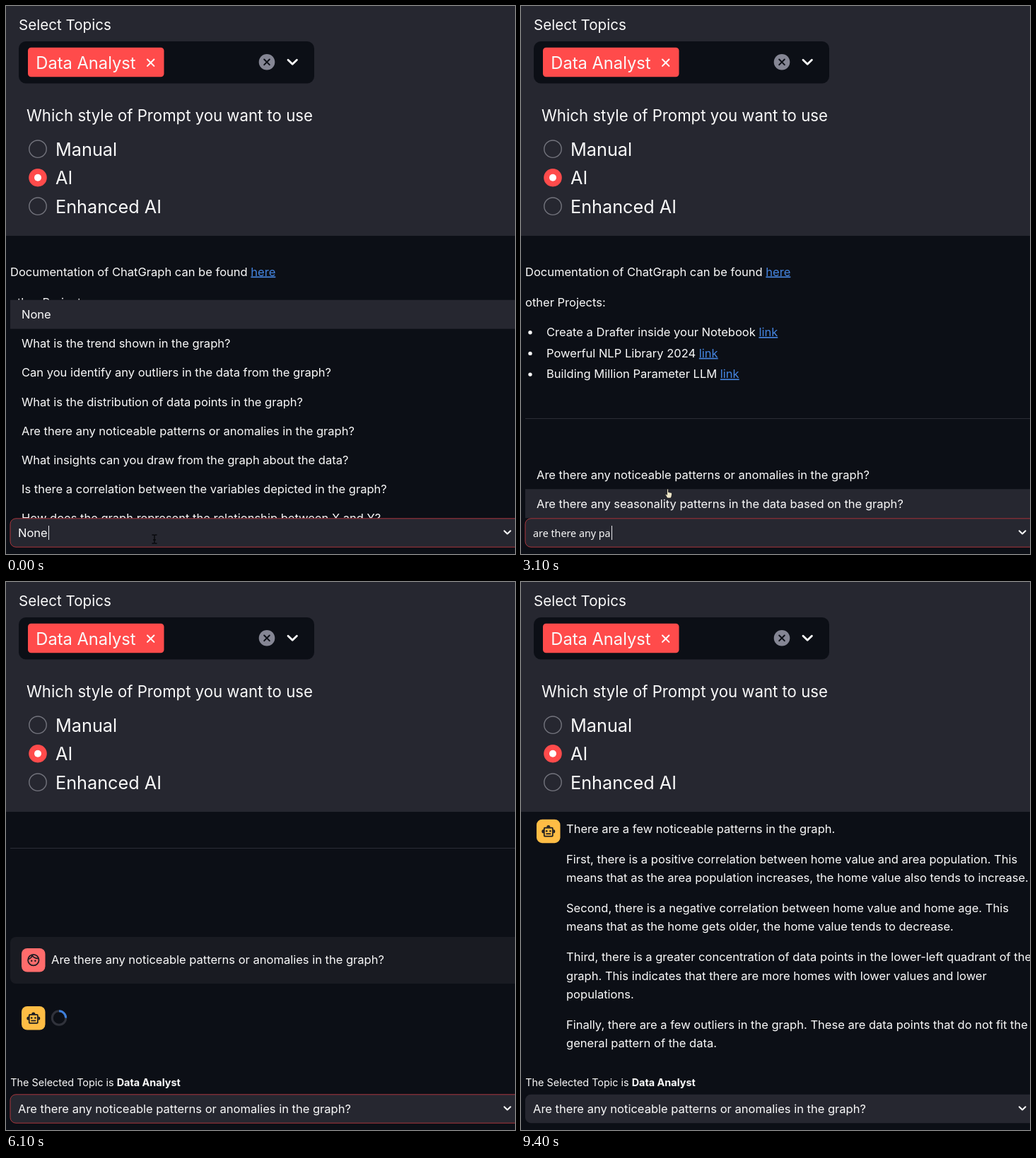
An HTML page that plays this animation: 720x775 px, repeating every 9.5 s.

```html
<!DOCTYPE html>
<html lang="en">
<head>
<meta charset="utf-8">
<title>Graph chat</title>
<style>
  html, body { margin: 0; height: 100%; overflow: hidden; background: #0c0f16; }
  svg { display: block; }
  text { font: 16.52px Inter, sans-serif; font-optical-sizing: none; fill: #fafafa; white-space: pre; }
  .link { fill: #4585e0; text-decoration: underline; }
  .typed { font: 14.3px "Noto Sans", sans-serif; }
  .small { font-size: 14.42px; }
  .bold { font-weight: 700; }
  .radio { font-size: 25.25px; }
  .line { fill: none; stroke-width: 2; stroke-linecap: round; stroke-linejoin: round; }
  .ink { fill: none; stroke: #1b1c22; stroke-width: 2; }
  .solid { fill: #1b1c22; stroke: none; }
</style>
</head>
<body>
<svg width="720" height="775" viewBox="0 0 720 775">
  <rect width="720" height="775" fill="#0c0f16"/>

  <g id="page">
    <text x="6" y="381.5">Documentation of ChatGraph can be found <tspan class="link">here</tspan></text>
    <text x="6" y="424.5">other Projects:</text>
    <g id="projects"></g>
    <path d="M6 583.5H720" stroke="#2b2d36"/>
    <g id="chat">
      <rect x="6" y="709" width="740" height="66" rx="8" fill="#191b22"/>
      <rect x="22" y="725" width="33.5" height="33.5" rx="8" fill="#ff6c6c"/>
      <g class="ink" transform="translate(38.8 741.7) scale(.86)">
        <circle r="9"/>
        <path d="M-8.5-1.5Q-3.5-3-2-7.5Q2-2 8.5-2.8"/>
        <g class="solid"><circle cx="-3" cy="1.2" r="1.4"/><circle cx="3" cy="1.2" r="1.4"/></g>
      </g>
      <text x="64" y="747.3" class="question"></text>
      <rect x="22" y="807" width="33.5" height="33.5" rx="8" fill="#ffbd45"/>
      <g class="ink" transform="translate(38.8 824) scale(.86)">
        <rect x="-7" y="-6" width="14" height="14" rx="1"/>
        <path class="solid" d="M-3-7a3 3 0 0 1 6 0ZM-8-3a3 3 0 0 0 0 6ZM8-3a3 3 0 0 1 0 6Z"/>
        <g class="solid"><circle cx="-3" cy="-.5" r="1.5"/><circle cx="3" cy="-.5" r="1.5"/></g>
        <path d="M-4 4H4"/>
      </g>
      <g id="spinner" fill="none" stroke-width="3">
        <circle cx="75" cy="823.5" r="9.7" stroke="#30323b"/>
        <path id="arc" d="M75 813.8A9.7 9.7 0 0 1 84.7 823.5" stroke="#3d7fdc"/>
      </g>
      <g id="answer"></g>
    </g>
  </g>

  <g id="sidebar">
    <rect width="720" height="325" fill="#262730"/>
    <text x="18" y="33.7" style="font-size:20.6px">Select Topics</text>
    <rect x="18" y="50" width="418" height="59.5" rx="10" fill="#0c0f16"/>
    <rect x="31" y="58.8" width="192.5" height="41.4" rx="4.5" fill="#ff4b4b"/>
    <text x="42.3" y="88.7" style="font-size:23.7px">Data Analyst</text>
    <path class="line" stroke="#fff" d="M200 75.5l9.4 9.4m0-9.4l-9.4 9.4"/>
    <circle cx="369" cy="79.3" r="11.3" fill="#858694"/>
    <path class="line" stroke="#0c0f16" d="M365.2 75.5l7.6 7.6m0-7.6l-7.6 7.6"/>
    <path class="line" stroke="#fff" style="stroke-width:2.8" d="M399 76.3l6.2 6 6.2-6"/>
    <text x="29" y="163.3" style="font-size:22.2px">Which style of Prompt you want to use</text>
    <g id="radios"></g>
  </g>

  <rect y="692" width="720" height="83" fill="#0c0f16"/>
  <text class="small" x="6.3" y="713.2">The Selected Topic is <tspan class="bold">Data Analyst</tspan></text>
  <clipPath id="menuClip"><rect y="415.4" width="720" height="309"/></clipPath>
  <g id="menu" clip-path="url(#menuClip)"></g>
  <rect id="field" x="6" y="724.8" width="740" height="40.4" rx="8" fill="#262730"/>
  <text id="value" x="17" y="750.6"></text>
  <path id="caret" d="M0 735V755" stroke="#e8e8ec"/>
  <path class="line" stroke="#fff" d="M704.8 742.3l4.4 4.2 4.4-4.2"/>

  <path id="beam" fill="none" stroke="#08090c" stroke-width="1.4" d="M-3.5-6H-1L0-5 1-6H3.5M0-5V5M-3.5 6H-1L0 5 1 6H3.5M-2 1H2"/>
  <path id="hand" fill="#eee6c8" stroke="#15161b" stroke-width=".8"
    d="M-2.5-6.5q1.2-.9 2 0V-2.5l4 .8q1.3.4 1.1 2L4 3.5 3 6H-2L-4.8 1.3q-.4-1.5.8-1l1.5 1Z"/>
</svg>

<script>
const LOOP = 9500, ROW = 41.2, MENU_BOTTOM = 724.4, MENU_HEIGHT = 309;
const TYPE_START = 280, KEY_TIME = 100, SELECT = 4600, SEND = 4800, REPLY = 7200;
const QUERY = "are there any pa";
const TYPE_END = TYPE_START + (QUERY.length - 1) * KEY_TIME;
const QUESTION = "Are there any noticeable patterns or anomalies in the graph?";
const OPTIONS = [
  "None",
  "What is the trend shown in the graph?",
  "Can you identify any outliers in the data from the graph?",
  "What is the distribution of data points in the graph?",
  QUESTION,
  "What insights can you draw from the graph about the data?",
  "Is there a correlation between the variables depicted in the graph?",
  "How does the graph represent the relationship between X and Y?",
  "Are there any seasonality patterns in the data based on the graph?"
];
const ANSWER = [
  ["There are a few noticeable patterns in the graph."],
  ["First, there is a positive correlation between home value and area population. This",
   "means that as the area population increases, the home value also tends to increase."],
  ["Second, there is a negative correlation between home value and home age. This",
   "means that as the home gets older, the home value tends to decrease."],
  ["Third, there is a greater concentration of data points in the lower-left quadrant of the",
   "graph. This indicates that there are more homes with lower values and lower",
   "populations."],
  ["Finally, there are a few outliers in the graph. These are data points that do not fit the",
   "general pattern of the data."]
];

const $ = id => document.getElementById(id);
const show = (id, on) => $(id).style.display = on ? "" : "none";
const label = (x, y, text, cls = "") => `<text x="${x}" y="${y}" class="${cls}">${text}</text>`;

$("projects").innerHTML = ["Create a Drafter inside your Notebook", "Powerful NLP Library 2024",
  "Building Million Parameter LLM"].map((name, i) => {
    const y = 467 + i * 29.7;
    return `<circle cx="13" cy="${y - 5.3}" r="2.7" fill="#fafafa"/>` +
      label(36, y, `${name} <tspan class="link">link</tspan>`);
  }).join("");

$("radios").innerHTML = ["Manual", "AI", "Enhanced AI"].map((name, i) => {
  const y = 202.2 + i * 40.5;
  const dot = i === 1
    ? `<circle cx="45" cy="${y}" r="12.8" fill="#ff4b4b"/><circle cx="45" cy="${y}" r="5" fill="#fff"/>`
    : `<circle cx="45" cy="${y}" r="12.2" fill="none" stroke="#74757e" stroke-width="1.4"/>`;
  return dot + label(70, y + 9.6, name, "radio");
}).join("");

let lineY = 826.3;
$("answer").innerHTML = ANSWER.map(lines => {
  const block = lines.map((line, i) => label(64, lineY + i * 26.35, line)).join("");
  lineY += lines.length * 26.35 + 16.5;
  return block;
}).join("");
document.querySelector(".question").textContent = QUESTION;

// Keeps options that contain the typed letters in order, exact phrases first.
function matches(query) {
  const exact = s => s.toLowerCase().includes(query);
  return OPTIONS.filter(s => {
    let at = 0;
    return [...query].every(c => (at = s.toLowerCase().indexOf(c, at) + 1));
  }).sort((a, b) => exact(b) - exact(a));
}

// Smooth value through [time, value] points.
function track(t, points) {
  let [t0, v0] = points[0];
  for (const [t1, v1] of points) {
    if (t < t1) {
      const u = Math.max(0, (t - t0) / (t1 - t0));
      return v0 + (v1 - v0) * u * u * (3 - 2 * u);
    }
    [t0, v0] = [t1, v1];
  }
  return v0;
}

function drawMenu(query, mouseY) {
  const items = matches(query);
  const top = MENU_BOTTOM - Math.min(items.length * ROW, MENU_HEIGHT);
  const active = mouseY < MENU_BOTTOM ? Math.floor((mouseY - top) / ROW) : 0;
  $("menu").innerHTML = `<rect x="6" y="${top}" width="714" height="${MENU_BOTTOM - top}" fill="#0c0f16"/>` +
    items.map((item, i) => {
      const y = top + i * ROW;
      const back = i === active ? `<rect x="6" y="${y}" width="714" height="${ROW}" fill="#262730"/>` : "";
      return back + label(22, y + 26.6, item);
    }).join("");
}

function draw(t) {
  const open = t < SELECT;
  const count = Math.floor((t - TYPE_START) / KEY_TIME) + 1;
  const query = QUERY.slice(0, Math.max(0, count));
  const mouseX = track(t, [[2300, 210], [2900, 209], [3300, 209], [3900, 214]]);
  const mouseY = track(t, [[2300, 754], [2900, 690], [3300, 690], [3900, 671]]);
  const overMenu = mouseY < MENU_BOTTOM;

  show("menu", open);
  if (open) drawMenu(query, mouseY);

  $("value").textContent = open ? query || "None" : QUESTION;
  $("value").setAttribute("class", open && query ? "typed" : "");
  const caretX = Math.round(18 + $("value").getComputedTextLength()) + .5;
  $("caret").setAttribute("transform", `translate(${caretX} 0)`);
  show("caret", open && (t < TYPE_END || (t - TYPE_END) % 1000 < 500));
  $("field").setAttribute("stroke", t < REPLY ? "#a8363c" : "none");

  for (const id of ["beam", "hand"]) $(id).setAttribute("transform", `translate(${mouseX} ${mouseY})`);
  show("beam", open && !overMenu);
  show("hand", open && overMenu);

  const scroll = t < SEND ? 0 : t < REPLY ? 207 : track(t, [[7700, 441], [7900, 471.3]]);
  $("page").setAttribute("transform", `translate(0 ${-scroll})`);
  show("chat", t >= SEND);
  show("spinner", t < REPLY);
  show("answer", t >= REPLY);
  $("arc").setAttribute("transform", `rotate(${(t - 6100) * .36} 75 823.5)`);
}

const start = performance.now();
function tick() {
  draw((performance.now() - start) % LOOP);
  requestAnimationFrame(tick);
}
tick();
</script>
</body>
</html>
```
